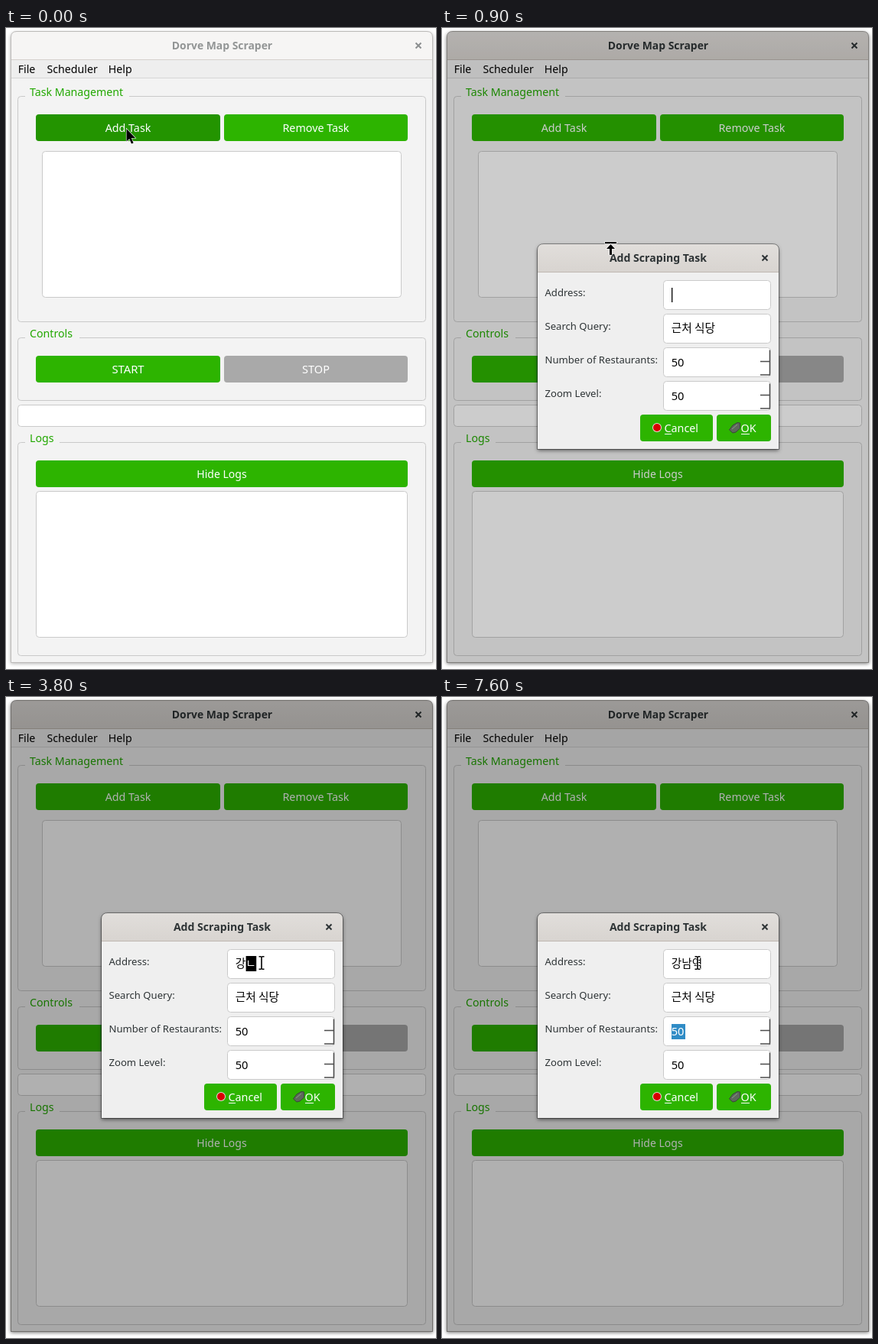
Animation of 562x839 px, one loop 8000 ms. Source, as an HTML page:

```html
<!DOCTYPE html>
<html lang="en">
<head>
<meta charset="utf-8">
<title>Map Scraper</title>
<style>
  html, body { margin: 0; width: 100%; height: 100%; overflow: hidden; background: #fff; }
  svg { display: block; width: 562px; height: 839px; }
  text { font: 14.2px "Noto Sans", "Noto Sans CJK KR", "Noto Sans CJK", sans-serif; white-space: pre; }
  .mid { text-anchor: middle; }
  .title { font-weight: 700; font-size: 13.9px; fill: #2e3436; }
  .legend { fill: #22a800; }
  .btn { fill: #2db400; }
  .cap { fill: #fff; font-size: 14.3px; }
  .label { fill: #2e3436; font-size: 13.1px; }
  .value { font-size: 14.67px; }
  .ko { font-family: "Noto Sans CJK KR", "Noto Sans CJK", "Noto Sans", sans-serif; }
  .frame { fill: none; stroke: #c9c9c9; }
  .field { fill: #fff; stroke: #cacaca; }
  .cross { fill: none; stroke: #2e3436; stroke-width: 2; }
  .spin { fill: none; stroke: #4c4c4c; stroke-width: 1.4; }
  .shadow { filter: drop-shadow(0 2px 2.5px rgba(0, 0, 0, .55)); }
  .idle .shadow { filter: drop-shadow(0 2px 2.5px rgba(0, 0, 0, .3)); }
  .idle .head { fill: #f6f5f4; }
  .idle .title { fill: #929595; }
  .idle .cross { stroke: #8b8e8f; }
  .idle .edge { stroke: #bcbab8; }
  .idle .rule { stroke: #d5d0cc; }
  .hover { fill: #239400; }
  .pointer { fill: #000; stroke: #fff; stroke-width: 1.2; paint-order: stroke; }
</style>
</head>
<body>
<svg viewBox="0 0 562 839">
  <defs>
    <linearGradient id="bar" x2="0" y2="1">
      <stop stop-color="#e1dedb"/><stop offset="1" stop-color="#d8d4d0"/>
    </linearGradient>
  </defs>

  <g id="win">
    <path class="shadow" fill="#f3f3f3" d="M6 830V12Q6 4 14 4H550Q558 4 558 12V830Z"/>
    <path class="head" fill="url(#bar)" d="M7 41V12Q7 5 14 5H550Q557 5 557 12V41Z"/>
    <path class="rule" stroke="#bfb8b1" d="M7 41.5H557"/>
    <path fill="#eee" d="M7 42H557V65H7Z"/>
    <path stroke="#d6d6d6" d="M7 65.5H557"/>
    <path class="edge" fill="none" stroke="#a09d9a" d="M6.5 830.5V12Q6.5 4.5 14 4.5H550Q557.5 4.5 557.5 12V830.5Z"/>
    <text class="title mid" x="282.5" y="28">Dorve Map Scraper</text>
    <path class="cross" d="M535.5 19.5l7 7m0-7l-7 7"/>
    <text x="15.7" y="59">File</text>
    <text x="53.5" y="59">Scheduler</text>
    <text x="133.8" y="59">Help</text>
    <g id="panels"></g>
  </g>
  <path id="dim" d="M6 831V12Q6 4 14 4H550Q558 4 558 12V831Z"/>

  <g id="dialog">
    <path class="shadow" fill="#efefef" d="M125 551V291Q125 283 133 283H432Q440 283 440 291V551Z"/>
    <path fill="url(#bar)" d="M125 319V291Q125 283 133 283H432Q440 283 440 291V319Z"/>
    <path stroke="#bfb8b1" d="M125 319.5H440"/>
    <path fill="none" stroke="#000" stroke-opacity=".35" d="M124.5 551.5V291Q124.5 282.5 133 282.5H432Q440.5 282.5 440.5 291V551.5Z"/>
    <text class="title mid" x="282.5" y="306" style="font-size:14.1px">Add Scraping Task</text>
    <path class="cross" d="M418.5 297.5l7 7m0-7l-7 7"/>
    <g id="form"></g>
    <circle cx="281" cy="523" r="6" fill="#e9d9d6"/>
    <circle cx="281" cy="523" r="5" fill="#d80000"/>
    <text class="cap" x="290.5" y="529">Cancel</text>
    <path stroke="#fff" d="M291 531.5H300"/>
    <path fill="#5d685c" stroke="#39443a" d="M375.5 526L380 520L386 516.5L389.5 517V524L384 529L380 530Z"/>
    <path fill="none" stroke="#8e9a8c" d="M379 525L386 519"/>
    <text class="cap" x="390.5" y="529">OK</text>
    <path stroke="#fff" d="M391 531.5H402"/>
    <rect id="mark" height="20"/>
    <text id="address" class="value ko" x="299.7" y="354"><tspan id="done"></tspan><tspan id="draft" fill="#fff"></tspan></text>
    <text id="query" class="value ko" x="299.7" y="398">근처 식당</text>
    <text id="count" class="value" x="299.7" y="443">50</text>
    <text class="value" x="299.7" y="487">50</text>
    <rect id="caret" x="300" width="1.3" height="19"/>
  </g>

  <g id="cursor">
    <path id="arrow" class="pointer" d="M.5 0V16.5L4.2 13L7 19.5L9.6 18.4L6.9 12H12Z"/>
    <path id="resize" class="pointer" d="M-7-8H8V-6H-7ZM.5-5L6 1H2V9H-1V1H-5Z"/>
    <path id="beam" class="pointer" d="M-3.5-9H-.8L0-8.3L.8-9H3.5V-7.6H.8V7.6H3.5V9H.8L0 8.3L-.8 9H-3.5V7.6H-.8V-7.6H-3.5Z"/>
  </g>
</svg>
<script>
const $ = id => document.getElementById(id);
const box = (cls, x, y, w, h, id = '') =>
  `<rect id="${id}" class="${cls}" x="${x}" y="${y}" width="${w}" height="${h}" rx="4"/>`;
const button = (x, y, w, text, id, size = 14.3) =>
  box('btn', x, y, w, 35, id) +
  `<text class="cap mid" x="${x + w / 2}" y="${y + 23}" style="font-size:${size}px">${text}</text>`;
const group = (y, h, text, gap) =>
  box('frame', 15.5, y + .5, 533, h) +
  `<path stroke="#f3f3f3" stroke-width="2" d="M25 ${y + .5}H${gap}"/>` +
  `<text class="legend" x="31" y="${y}">${text}</text>`;

$('panels').innerHTML =
  group(89, 295, 'Task Management', 161) +
  button(39, 113, 241, 'Add Task', 'add') + button(285, 113, 240, 'Remove Task', 'remove') +
  box('field', 47.5, 161.5, 469, 191) +
  group(405, 82, 'Controls', 96) +
  button(39, 429, 241, 'START', 'start', 14.8) + button(285, 429, 240, 'STOP', 'stop', 14.5) +
  box('field', 15.5, 493.5, 533, 28) +
  group(542, 279, 'Logs', 70) +
  button(39, 566, 486, 'Hide Logs', 'hide', 14) +
  box('field', 39.5, 606.5, 485, 191);
$('stop').style.fill = '#a9a9a9';

$('form').innerHTML =
  ['Address:', 'Search Query:', 'Number of Restaurants:', 'Zoom Level:'].map((text, i) => {
    const y = 330.5 + 44 * i;
    const spin = i > 1 ? `<path class="spin" d="M428.4 ${y + 3}V${y + 35.5}H416M428 ${y + 18}H416"/>` : '';
    return `<text class="label" x="134.5" y="${y + 20.5}">${text}</text>` +
      box('field', 289.5, y, 140, 38) + spin;
  }).join('') + box('btn', 259, 506, 95, 35) + box('btn', 359, 506, 71, 35);

// time, committed text, syllable being composed
const typing = [
  [0, '', ''], [1700, '', 'ㄱ'], [1800, '', '가'], [2300, '', '개'], [2800, '', 'ㄱ'],
  [2900, '', '가'], [3100, '', '강'], [3800, '강', 'ㄴ'], [3900, '강', '나'],
  [4100, '강', '남'], [4600, '강남', '여'], [4800, '강남', '역'], [5200, '강남역', '']
];
// time, x, y, shape
const moves = [
  [0, 157, 132, 'arrow'], [700, 160, 137, 'arrow'], [800, 177, 190, 'arrow'],
  [900, 220, 288, 'resize'], [1000, 323, 308, 'arrow'], [1100, 338, 322, 'arrow'],
  [1200, 338, 336, 'beam'], [1300, 336, 339, 'beam'], [1400, 335, 345, 'beam'], [1500, 334, 348, 'beam']
];
const at = (list, t) => list.filter(k => k[0] <= t).pop();
const show = (id, on) => $(id).style.display = on ? '' : 'none';
const easeOut = x => 1 - (1 - Math.min(1, Math.max(0, x))) ** 2;
const attrs = (id, values) => { for (const k in values) $(id).setAttribute(k, values[k]); };

function draw(t) {
  $('win').setAttribute('class', t < 500 ? 'idle' : '');
  $('add').setAttribute('class', t < 800 ? 'hover' : 'btn');
  attrs('dim', { opacity: .31 * easeOut((t - 700) / 500) });

  const grow = easeOut((t - 700) / 150);
  show('dialog', grow > 0);
  attrs('dialog', { transform: `translate(0 ${417 * (1 - grow)}) scale(1 ${grow})`, opacity: grow });

  const [, done, draft] = at(typing, t);
  $('done').textContent = done;
  $('draft').textContent = draft;

  const inQuery = t >= 5200 && t < 5700, inCount = t >= 5700;
  $('query').style.fill = inQuery ? '#fff' : '#000';
  $('count').style.fill = inCount ? '#fff' : '#000';
  show('mark', draft || inQuery || inCount);
  if (draft) attrs('mark', { x: 300 + 13.6 * done.length, y: 339, width: done ? 13.6 : 15, fill: '#000' });
  else attrs('mark', { x: 300, y: inCount ? 428 : 383.5, width: inCount ? 18 : 58.5, fill: '#308cc6' });

  const blink = inCount && (t < 6400 || (t >= 7000 && t < 7600));
  show('caret', t < 1700 || blink);
  attrs('caret', { y: inCount ? 428 : 340 });

  const [, x, y, shape] = at(moves, t);
  attrs('cursor', { transform: `translate(${x} ${y})` });
  for (const id of ['arrow', 'resize', 'beam']) show(id, id === shape);
}

const begin = performance.now();
let last = -1;
function tick() {
  const t = Math.floor((performance.now() - begin) % 8000 / 100) * 100;
  if (t !== last) draw(last = t);
  requestAnimationFrame(tick);
}
tick();
</script>
</body>
</html>
```
